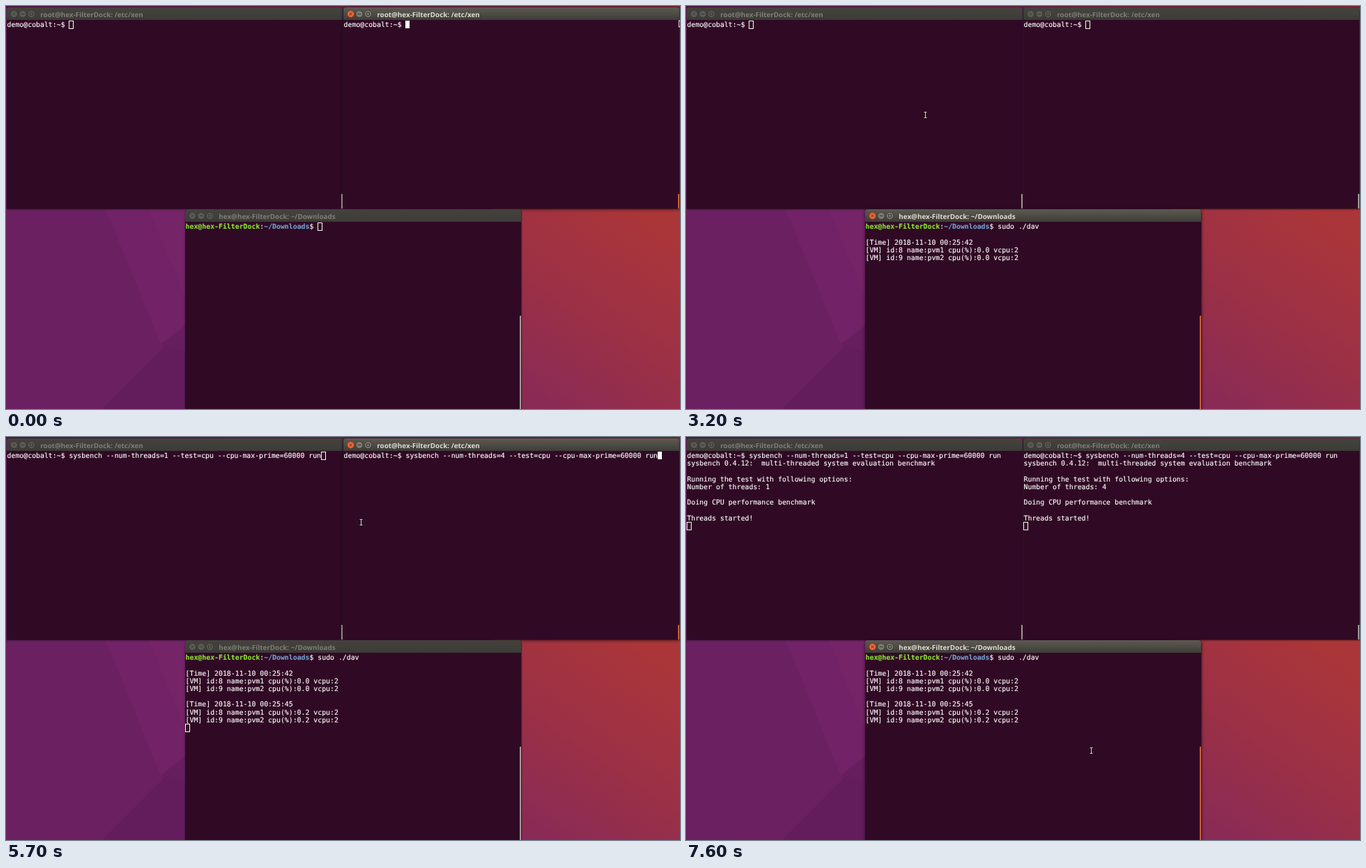
Recreate the animation shown at these times as an HTML page. Size 967x579 px, loop 8000 ms.

```html
<!DOCTYPE html>
<html lang="en">
<head>
<meta charset="utf-8">
<title>Terminals</title>
<style>
  html, body { margin: 0; width: 100%; height: 100%; overflow: hidden; background: #6b2062; }
  #stage { position: absolute; left: 0; top: 0; width: 967px; height: 579px; overflow: hidden; text-rendering: geometricPrecision; }
  #wall, #mouse { position: absolute; left: 0; top: 0; }
  .win {
    position: absolute; width: 482px; background: #300a24; border-radius: 4px 4px 0 0;
    box-shadow: 1px 1px 1px rgba(0, 0, 0, .35), 0 1px 3px rgba(0, 0, 0, .45);
  }
  .win.on { box-shadow: 1px 1px 1px rgba(0, 0, 0, .35), 0 1px 5px rgba(0, 0, 0, .6); }
  .bar {
    height: 18px; border-radius: 4px 4px 0 0; background: linear-gradient(#44433e, #3c3b37);
    color: #807d78; font: bold 9.85px/18.5px "Open Sans", sans-serif; white-space: pre;
  }
  .bar span { position: absolute; left: 48.3px; top: 1px; }
  .bar svg { position: absolute; left: 0; top: 0; }
  .on .bar { background: linear-gradient(#5c5a52, #3e3d38); color: #dfdbd2; }
  .bar circle { fill: #5d5b56; stroke: #35342f; stroke-width: .7; }
  .bar path { fill: none; stroke: #38372f; }
  .on .bar circle { fill: #7c7a71; }
  .on .bar circle:first-child { fill: #f0653a; stroke: #64301f; }
  pre {
    position: absolute; left: .6px; top: 20.2px; margin: 0; color: #fff;
    font: 9.85px/11.2px "DejaVu Sans Mono", monospace; -webkit-text-stroke: .15px;
  }
  pre b:first-child { color: #8ae234; }
  pre b + b { color: #729fcf; }
  .caret { position: absolute; box-sizing: border-box; width: 7px; height: 12px; border: 1px solid #fff; }
  .on .caret { width: 6px; height: 11px; background: #fff; }
  .thumb { position: absolute; right: .5px; bottom: 0; width: 2px; background: #a39c97; }
  .on .thumb { background: #c85f3c; }
</style>
</head>
<body>
<div id="stage">
  <svg id="wall" width="967" height="579">
    <defs>
      <linearGradient id="warm" gradientUnits="userSpaceOnUse" x1="950" y1="320" x2="760" y2="600">
        <stop offset="0" stop-color="#ab3639"/>
        <stop offset=".5" stop-color="#9b3046"/>
        <stop offset="1" stop-color="#872a59"/>
      </linearGradient>
      <linearGradient id="top">
        <stop offset="0" stop-color="#4e1747"/>
        <stop offset="1" stop-color="#7a2730"/>
      </linearGradient>
    </defs>
    <rect width="967" height="579" fill="#6b2062"/>
    <path d="M143 292H257V459L222 486Z" fill="#722266"/>
    <path d="M205 292H257V420Z" fill="#752468"/>
    <path d="M257 459L138 579H257Z" fill="#641d5c"/>
    <path d="M222 486L257 459V497Z" fill="#671e5e"/>
    <rect x="700" y="3" width="267" height="576" fill="url(#warm)"/>
    <rect width="967" height="3" fill="url(#top)"/>
  </svg>
  <svg id="mouse" width="967" height="579">
    <g id="beam" fill="none">
      <path d="M-2.5 -4H2.5M0 -4V4M-2.5 4H2.5" stroke="#150410" stroke-width="2"/>
      <path d="M-2 -4H2M0 -4V4M-2 4H2" stroke="#d8d8d4"/>
    </g>
    <path id="arrow" d="M0 0V10L2.4 7.8L4 11.4L5.7 10.6L4.1 7.2H7.2Z" fill="#111" stroke="#fff" stroke-width=".9"/>
  </svg>
</div>
<script>
const LOOP = 8000, TICK = 100, CELL = 5.93, ROW = 11.2, BAR = 18;
const [stage, mouse, beam, arrow] = ['stage', 'mouse', 'beam', 'arrow'].map(id => document.getElementById(id));

const bench = n => `sysbench --num-threads=${n} --test=cpu --cpu-max-prime=60000 run`;
const started = n => bench(n) + `
sysbench 0.4.12:  multi-threaded system evaluation benchmark

Running the test with following options:
Number of threads: ${n}

Doing CPU performance benchmark

Threads started!
`;
const report = (sec, cpu) => `\n[Time] 2018-11-10 00:25:${sec}\n` +
  [1, 2].map(i => `[VM] id:${i + 7} name:pvm${i} cpu(%):${cpu} vcpu:2\n`).join('');
const dav = 'sudo ./dav';
const first = dav + '\n' + report(42, '0.0');

// Stepping back through earlier commands, one per tick.
const recall = (start, ...cmds) => cmds.map((cmd, i) => ({ t: start + i * TICK, text: cmd }));

const shell = 'demo@cobalt:~$ ';
const host = 'hex-FilterDock';
const upper = { y: 2, h: 289, thumb: 21, title: `root@${host}: /etc/xen`, prompt: shell };
const wins = [
  { ...upper, x: 1, log: [...recall(3800, bench(4), bench(1)), { t: 6200, text: started(1) }] },
  { ...upper, x: 484, log: [...recall(5200, bench(1), bench(4)), { t: 6600, text: started(4) }] },
  { x: 257, y: 292, h: 287, thumb: 134, title: `hex@${host}: ~/Downloads`,
    prompt: `<b>hex@${host}</b>:<b>~/Downloads</b>$ `,
    log: [
      ...recall(1200, 'sudo xl list', 'sudo xl list -v', 'sudo xl top', 'sudo xl vcpulist'),
      { t: 1700, text: dav }, { t: 2200, text: dav + '\n' }, { t: 2400, text: first },
      { t: 5200, text: first + report(45, '0.2') }
    ] }
];

// Each trip starts where the one before ended; arriving focuses the window below.
const trips = [
  { start: 0, end: 100, to: [963, 286] },
  { start: 250, end: 700, hide: 1200, to: [544, 403] },
  { start: 2850, end: 3300, hide: 3800, to: [341, 153] },
  { start: 4250, end: 4700, hide: 5200, to: [523, 122] },
  { start: 5690, end: 6000, to: [371, 127] },
  { start: 6200, end: 6400, hide: 6600, to: [572, 114] },
  { start: 6850, end: 7200, to: [581, 450] }
];
trips.forEach((trip, i) => { trip.from = i ? trips[i - 1].to : [965, 20]; });

const easeOut = p => 1 - (1 - p) ** 3;
const blinkOff = t => (t >= 2900 && t < 3300) || t >= 7600;
const below = (x, y) => wins.find(w => x >= w.x && x < w.x + 482 && y > w.y + BAR && y < w.y + w.h);

function build(w) {
  const el = document.createElement('div');
  const dots = [0, 1, 2].map(i => `<circle cx="${10.5 + i * 12.5}" cy="9.5" r="5"/>`).join('');
  el.className = 'win';
  el.style.cssText = `left:${w.x}px;top:${w.y}px;height:${w.h}px`;
  el.innerHTML = `<div class="bar"><svg width="48" height="18">${dots}
    <path d="M8.7 7.7l3.6 3.6m0-3.6l-3.6 3.6M20.7 9.5h4.6M33.5 7.6h4v3.8h-4z"/></svg>
    <span>${w.title}</span></div><pre>${w.prompt}<span></span></pre>
    <div class="caret"></div><div class="thumb" style="height:${w.thumb}px"></div>`;
  stage.insertBefore(el, mouse);
  w.el = el;
  w.out = el.querySelector('pre span');
  w.caret = el.querySelector('.caret');
  w.indent = el.querySelector('pre').textContent.length;
}

function drawWindow(w, t, on) {
  const text = w.log.findLast(e => e.t <= t)?.text ?? '';
  const lines = text.split('\n'), row = lines.length - 1;
  const col = lines[row].length + (row ? 0 : w.indent);
  if (w.out.textContent !== text) w.out.textContent = text;
  w.el.classList.toggle('on', on);
  w.caret.style.left = Math.floor(.6 + col * CELL) + 'px';
  w.caret.style.top = Math.round(19 + row * ROW) + 'px';
  w.caret.style.visibility = on && blinkOff(t) ? 'hidden' : 'visible';
}

function drawMouse(t) {
  const { start, end, hide = LOOP, from, to } = trips.findLast(trip => trip.start <= t);
  const p = easeOut(Math.min(1, (t - start) / (end - start)));
  const [x, y] = from.map((a, i) => Math.round(a + (to[i] - a) * p));
  const inside = below(x, y);
  mouse.style.display = t < hide ? 'block' : 'none';
  beam.style.display = inside ? 'inline' : 'none';
  arrow.style.display = inside ? 'none' : 'inline';
  (inside ? beam : arrow).setAttribute('transform', `translate(${x + .5} ${y + .5})`);
}

function draw(t) {
  const arrived = trips.findLast(trip => trip.end <= t) ?? trips[0];
  const active = below(...arrived.to);
  wins.forEach(w => drawWindow(w, t, w === active));
  drawMouse(t);
}

function tick() {
  const t = performance.now() % LOOP;
  draw(t - t % TICK);
  requestAnimationFrame(tick);
}

wins.forEach(build);
tick();
</script>
</body>
</html>
```
